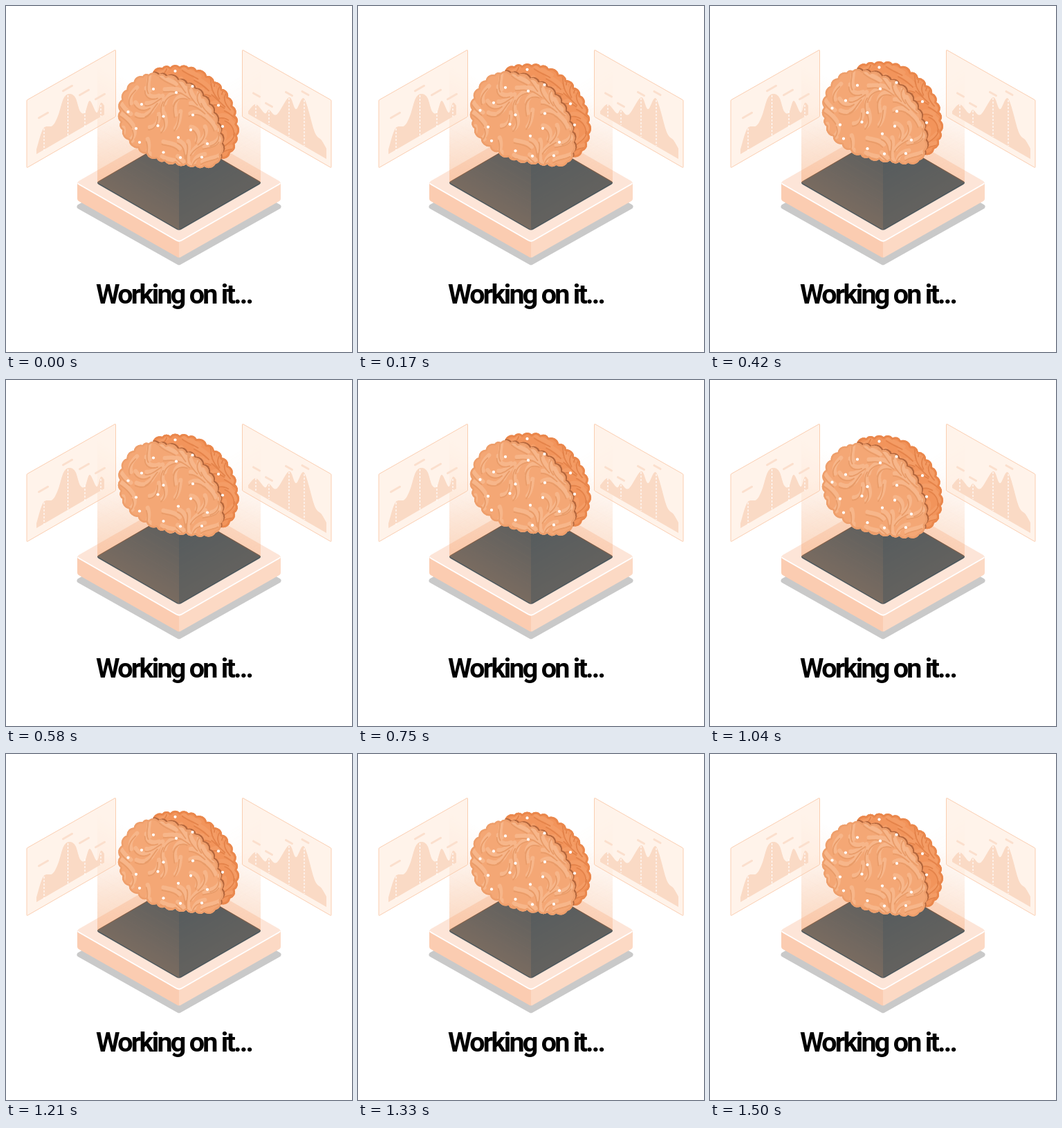
An HTML page that plays this animation: 500 px wide and 500 px high, repeating every 1540 ms.

```html
<!DOCTYPE html>
<html lang="en">
<head>
<meta charset="utf-8">
<title>Working on it</title>
<style>
html, body { margin: 0; width: 100%; height: 100%; overflow: hidden; background: #fff; }
svg { display: block; width: 100vw; height: 100vh; }
.line { fill: none; stroke-linecap: round; stroke-linejoin: round; }
.dash { stroke: #fff; stroke-width: 1.1; stroke-dasharray: 3 2; }
.label { stroke: #fbdfcd; stroke-width: 3; stroke-linecap: round; }
.panel { fill: #ffe1cb; fill-opacity: .4; stroke: #fbceb1; stroke-linejoin: round; }
text { font: 700 39.5px Roboto, sans-serif; letter-spacing: -.07em; }
</style>
</head>
<body>
<svg viewBox="0 0 500 500">
  <defs>
    <linearGradient id="glow" x1="0" y1="0" x2="0" y2="1">
      <stop offset="0" stop-color="#f5a26b" stop-opacity="0"/>
      <stop offset="1" stop-color="#f5a26b"/>
    </linearGradient>
    <path id="pit" d="M134 253L246 188Q250 185.500 254 188L366 253Q370 255.500 366 258L254 322.500Q250 325 246 322.500L134 258Q130 255.500 134 253Z"/>
    <clipPath id="pitClip"><use href="#pit"/></clipPath>
    <path id="front"/>
    <path id="back"/>
    <clipPath id="frontClip"><use href="#front"/></clipPath>
    <clipPath id="backClip"><use href="#back"/></clipPath>
  </defs>

  <path d="M106 290L250 207L394 290L250 371Z" fill="#c9c9c9" stroke="#c9c9c9" stroke-width="7" stroke-linejoin="round"/>
  <path d="M103 255V278Q103 281 106 282.500L246 362Q248 363.500 250 363.500V335Z" fill="#fbccb1"/>
  <path d="M397 255V278Q397 281 394 282.500L254 362Q252 363.500 250 363.500V335Z" fill="#fcd9c4"/>
  <path d="M105 253L246 172Q250 170 254 172L395 253Q398 255.500 395 257.500L254 338.500Q250 341 246 338.500L105 257.500Q102 255.500 105 253Z" fill="#fde5d8"/>
  <path class="line" d="M104 256.500Q104 257 106 258L246 338.500Q250 341 254 338.500L394 258Q396 257 396 256.500" stroke="#fff" stroke-width="1.800"/>

  <use href="#pit" fill="#4d585d"/>
  <path clip-path="url(#pitClip)" d="M120 262L250 187L380 262V240L250 170L120 240Z" fill="#4a3c35"/>
  <g id="walls"></g>

  <path id="panel" class="panel" d="M30 137Q30 136 31 135.500L157 64Q158.500 63 158.500 65V159Q158.500 160 157.500 160.500L31.500 233Q30 234 30 232.500Z"/>
  <use href="#panel" transform="matrix(-1 0 0 1 500 0)"/>
  <g id="charts"></g>

  <g id="brain">
    <use href="#back" fill="#f2945b"/>
    <g clip-path="url(#backClip)">
      <g id="backFolds"></g>
      <use href="#back" class="line" stroke="#ea874c" stroke-width="6"/>
      <use href="#front" x="2" y="-1.500" fill="#b4673d"/>
    </g>
    <use href="#front" fill="#f4a775"/>
    <g clip-path="url(#frontClip)">
      <g id="frontFolds"></g>
      <use href="#front" class="line" stroke="#ee9f6c" stroke-width="5"/>
    </g>
    <g id="nodes" fill="#fff"></g>
  </g>

  <text x="130" y="430">Working on it...</text>
</svg>
<script>
const NS = "http://www.w3.org/2000/svg";
const $ = id => document.getElementById(id);

function add(parent, tag, attrs) {
  const el = document.createElementNS(NS, tag);
  for (const k in attrs) el.setAttribute(k, attrs[k]);
  return parent.appendChild(el);
}

const pairs = text => text.trim().split(/\s+/).map(p => p.split(",").map(Number));

function random(seed) {
  return () => (seed = (seed * 16807) % 2147483647) / 2147483647;
}

// Dense points on a smooth curve through the key points
function smooth(keys, closed) {
  const n = keys.length, out = [];
  const at = i => keys[closed ? (i + n) % n : Math.max(0, Math.min(n - 1, i))];
  for (let i = 0; i < (closed ? n : n - 1); i++) {
    const [a, b, c, d] = [at(i - 1), at(i), at(i + 1), at(i + 2)];
    for (let t = 0; t < 1; t += .05)
      out.push([0, 1].map(k => b[k] + t / 2 * (c[k] - a[k] +
        t * (2 * a[k] - 5 * b[k] + 4 * c[k] - d[k] + t * (3 * (b[k] - c[k]) + d[k] - a[k])))));
  }
  if (!closed) out.push(at(n - 1));
  return out;
}

const span = (p, q) => Math.hypot(q[0] - p[0], q[1] - p[1]);

// Closed outline with rounded bumps of slightly varied width
function bumps(text, seed) {
  const rnd = random(seed), pts = smooth(pairs(text), true), ends = [pts[0]];
  let last = pts[0], size = 14;
  for (const p of pts) {
    if (span(last, p) < size || span(p, pts[0]) < 9) continue;
    ends.push(last = p);
    size = 11 + 6 * rnd();
  }
  ends.push(pts[0]);
  return ends.reduce((d, p, i) => {
    if (!i) return "M" + p;
    const r = span(ends[i - 1], p) * .68;
    return d + `A${r} ${r} 0 0 1 ${p}`;
  }, "");
}

$("front").setAttribute("d", bumps(`206,99 236,103 270,118 290,138 302,161 310,190 311,211
  302,229 284,232 256,228 228,224 203,213 182,198 168,178 165,146 174,122 187,108`, 7));
$("back").setAttribute("d", bumps(`212,97 245,88 274,92 305,113 325,139 334,178 328,205
  314,220 296,210 262,140`, 11));

// Winding folds: short traces through a wavy field, each with a lit ridge
function folds(parent, [x0, y0, x1, y1], light, dark, seed) {
  const rnd = random(seed);
  let d = "";
  for (let gy = y0; gy < y1; gy += 19)
    for (let gx = x0; gx < x1; gx += 20) {
      let x = gx + 8 * rnd(), y = gy + 8 * rnd();
      d += `M${x} ${y}`;
      for (let s = 0; s < 13; s++) {
        const a = .6 + 1.3 * Math.sin(x / 19 + seed) + 1.2 * Math.cos(y / 17);
        d += `L${x += 2 * Math.cos(a)} ${y += 2 * Math.sin(a)}`;
      }
    }
  add(parent, "path", { class: "line", d, stroke: light, "stroke-width": 6, transform: "translate(2 -4)" });
  add(parent, "path", { class: "line", d, stroke: dark, "stroke-width": 1.8 });
}
folds($("frontFolds"), [160, 100, 312, 236], "#f7b68a", "#e99c69", 5);
folds($("backFolds"), [210, 88, 338, 222], "#f49c65", "#e4834a", 3);

for (const [cx, cy] of pairs(`213,120 246,125 196,142 176.5,153 227.5,159.5
  270,157.5 219.5,173 188,177 267,179 249,190 193,197 291,199 227.5,211.5
  252,219 283,218.5 244.5,94 269.5,116 307,143.5 313,174`))
  add($("nodes"), "circle", { cx, cy, r: 2.1 });

// Upright sheet of light standing on one edge of the pit
function wall(x, y, skew, height, opacity) {
  const g = add($("walls"), "g", { transform: `translate(${x} ${y}) skewY(${skew})`, opacity });
  add(g, "rect", { y: -height, width: 118, height, fill: "url(#glow)" });
  for (let h = 13; h < height * .6; h += 13)
    add(g, "line", { x2: 118, y1: -h, y2: -h, stroke: "#f5a26b", "stroke-opacity": .3 * (1 - h / height) });
}
wall(132, 255, -30, 100, .22);
wall(250, 187, 30, 100, .22);
wall(132, 255, 30, 175, .26);
wall(250, 323, -30, 175, .13);

function chart(line, floor, tilt, dashes, labels, half) {
  const top = smooth(pairs(line));
  add($("charts"), "path", { d: "M" + top.join("L") + floor + "Z", fill: "#fadac5" });
  for (const [x, y1, y2] of pairs(dashes))
    add($("charts"), "line", { class: "dash", x1: x, x2: x, y1, y2 });
  for (const [x, y] of pairs(labels))
    add($("charts"), "line", { class: "label", x1: x - half, x2: x + half, y1: y - tilt * half, y2: y + tilt * half });
}
chart("44,207 54,177 67,173 75,159 83,134 91,127 100,132 107,152 114,154 121,137 131,154 137,140 142,144",
  "V157L44 214", -.57, "55,177,209 89.5,129,190 114,152,176 137,143,160",
  "54,158 89,119 113,125 136,131", 6.5);
chart("350,152 361,142 374,155 380,150 391,157 409,132 419,149 431,134 446,182 456,194 463,206",
  "V221L350 156", .57, "361,142,161 380,151,172 409,133,189 431,136,202",
  "362,128.5 380,143 409,127 432.5,126", 4.5);

const LOOP = 1540, STEPS = 37, RISE = 9.9;

function draw(ms) {
  const step = Math.min(STEPS - 1, Math.floor((ms % LOOP + 5) * STEPS / LOOP));
  const lift = RISE * (1 - Math.abs(step - 17.5) / 18.5) - .54;
  $("brain").setAttribute("transform", `translate(0 ${-lift})`);
}

const start = performance.now();
function tick(now) {
  draw(Math.max(0, now - start));
  requestAnimationFrame(tick);
}
draw(0);
requestAnimationFrame(tick);
</script>
</body>
</html>
```
